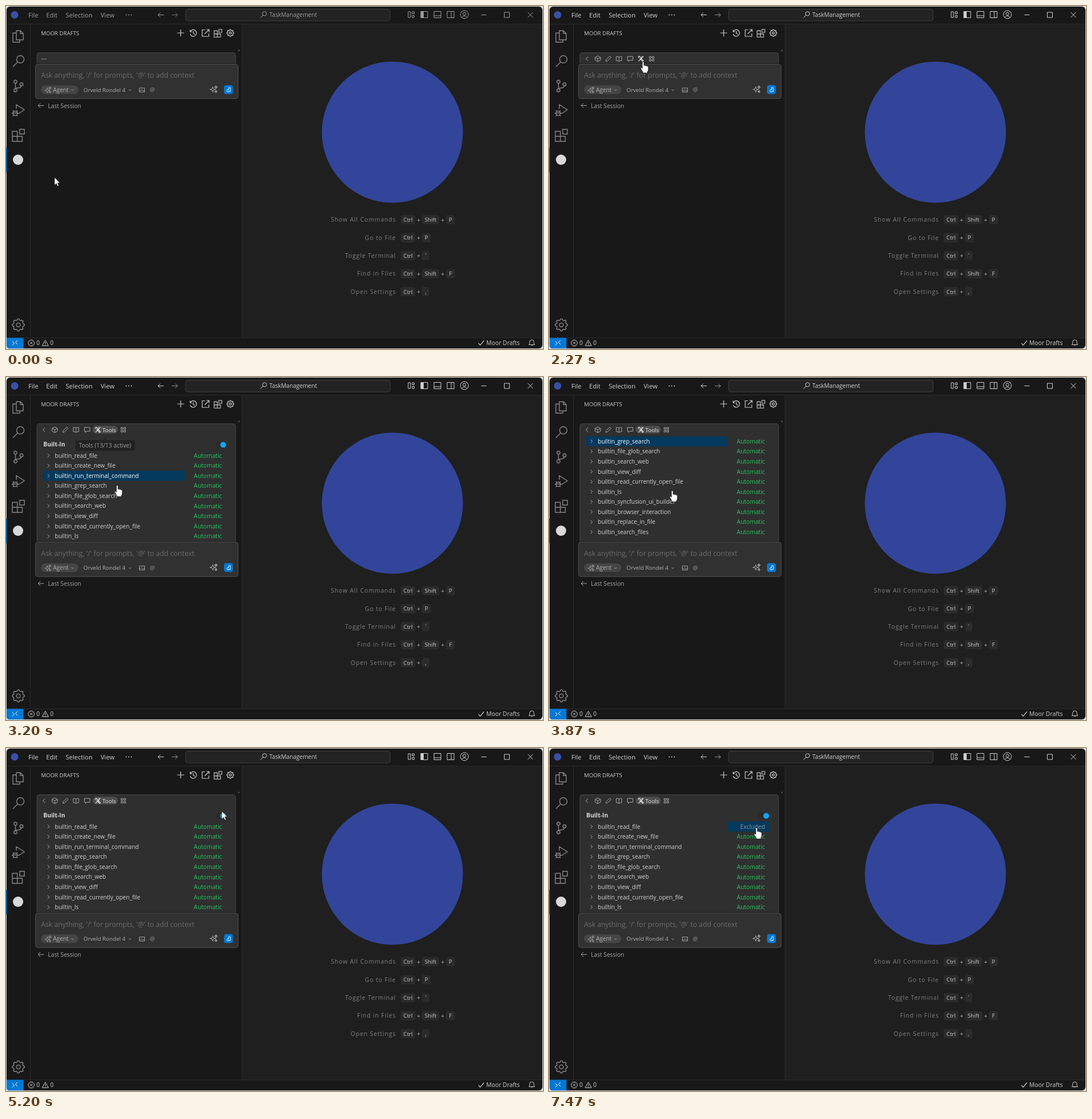
These frames come from a looping animation (936 px wide and 598 px high, 8000 ms). An HTML page:

```html
<!DOCTYPE html>
<html lang="en">
<head>
<meta charset="utf-8">
<title>Tool settings</title>
<style>
html, body { margin: 0; width: 100%; height: 100%; overflow: hidden; background: #dcdcdc; }
svg { display: block; width: 936px; height: 598px; }
text { font-family: "Open Sans", "Noto Sans", sans-serif; white-space: pre; }
</style>
</head>
<body>
<svg id="stage" viewBox="0 0 936 598" xmlns="http://www.w3.org/2000/svg"></svg>
<script>
const LOOP = 8000, TICK = 200 / 3;
const ROW = 17.57, LIST_TOP = 128.2;
const TOOLS = ['read_file', 'create_new_file', 'run_terminal_command', 'grep_search',
  'file_glob_search', 'search_web', 'view_diff', 'read_currently_open_file', 'ls',
  'syncfusion_ui_builder', 'browser_interaction', 'replace_in_file', 'search_files'];

// drawing helpers
const text = (x, mid, size, fill, str, extra = '') =>
  `<text x="${x}" y="${mid + size * 0.36}" font-size="${size}" fill="${fill}" ${extra}>${str}</text>`;
const rect = (x, y, w, h, fill, r = 0, extra = '') =>
  `<rect x="${x}" y="${y}" width="${w}" height="${h}" rx="${r}" fill="${fill}" ${extra}/>`;
const dot = (x, y, r, fill, extra = '') => `<circle cx="${x}" cy="${y}" r="${r}" fill="${fill}" ${extra}/>`;
const icon = (x, y, d, color = '#ccc', width = 1, extra = '') =>
  `<path transform="translate(${x} ${y})" d="${d}" fill="none" stroke="${color}" stroke-width="${width}" ${extra}/>`;
const END = 'text-anchor="end"', MIDDLE = 'text-anchor="middle"';
const ring = (x, y, r) => `M${x - r} ${y}a${r} ${r} 0 1 0 ${2 * r} 0a${r} ${r} 0 1 0 ${-2 * r} 0`;
const box = (x, y, w, h) => `M${x} ${y}h${w}v${h}h${-w}z`;
const star = (x, y, r) => `M${x} ${y - r}Q${x} ${y} ${x + r} ${y}Q${x} ${y} ${x} ${y + r}` +
  `Q${x} ${y} ${x - r} ${y}Q${x} ${y} ${x} ${y - r}`;

function gear(r) {
  let d = '';
  for (let i = 0; i < 32; i++) {
    const a = (i - 0.5) * Math.PI / 16, k = i % 4 < 2 ? r : r * 0.8;
    d += (i ? 'L' : 'M') + (k * Math.cos(a)).toFixed(2) + ' ' + (k * Math.sin(a)).toFixed(2);
  }
  return d + 'Z' + ring(0, 0, r * 0.32);
}
const blocks = s => box(-s, -s * 0.66, s * 0.83, s * 0.83) + box(-s, s * 0.17, s * 0.83, s * 0.83) +
  box(-s * 0.17, s * 0.17, s * 0.83, s * 0.83) + box(s * 0.22, -s, s * 0.78, s * 0.78);
const lens = r => ring(r * 0.3, -r * 0.3, r * 0.65) + `M${-r * 0.2} ${r * 0.2}L${-r} ${r}`;
const sparkle = star(-1, 1, 4.5) + star(3.5, -3, 2.4) + star(3.5, 4, 1.8);
const leftArrow = 'M5 0H-5M-1 -4L-5 0L-1 4';
const rightArrow = 'M-5 0H5M1 -4L5 0L1 4';
const down = 'M-2.2 -1L0 1.2L2.2 -1';
const grid = box(-4, -4, 3, 3) + box(1, -4, 3, 3) + box(-4, 1, 3, 3) + box(1, 1, 3, 3);

function frame() {
  return rect(1, 1, 934, 596, '#181818', 6) +
    rect(411, 31, 524, 547, '#1f1f1f') +
    icon(0, 0, 'M1 31.5H935M42.5 32V578M411.5 32V578M1 578.5H935', '#2b2b2b');
}

function titleBar() {
  const c = 'currentColor';
  let s = rect(313, 5.5, 356.5, 20.5, '#232323', 4, 'stroke="#3d3d3d"') + dot(15, 15.5, 6.5, '#3a50a8');
  [[39, 'File'], [70, 'Edit'], [104, 'Selection'], [165, 'View']]
    .forEach(([x, label]) => s += text(x, 16, 11.1, c, label));
  [209.5, 214, 218.5].forEach(x => s += dot(x, 15.5, 0.9, c));
  return `<g id="title">` + s + text(459, 15.5, 10.1, c, 'TaskManagement') +
    icon(270, 15.5, leftArrow, c) + icon(294, 15.5, rightArrow, c, 1, 'opacity=".65"') +
    icon(449, 15, lens(5.5), c) +
    icon(706, 15, box(-5, -5, 4, 10) + box(2, -5, 3.5, 3.5) + box(2, 1.5, 3.5, 3.5), c) +
    icon(729, 15, box(-6, -5.5, 12, 11), c) + rect(723, 9.5, 5, 11, c) +
    icon(752, 15, box(-6, -5.5, 12, 11) + 'M-6 2H6', c) +
    icon(775, 15, box(-6, -5.5, 12, 11) + 'M1 -5.5V5.5', c) +
    icon(799, 15, ring(0, 0, 7) + ring(0, -1.5, 2.5) + 'M-4.8 5Q0 -1 4.8 5', c) +
    icon(833, 15.5, 'M-4.5 0H4.5', c) + icon(873, 15.5, box(-4.5, -4.5, 9, 9), c) +
    icon(914, 15.5, 'M-4.5 -4.5L4.5 4.5M4.5 -4.5L-4.5 4.5', c) + '</g>';
}

function activityBar() {
  const c = '#868686', w = 1.4;
  return icon(21, 53, 'M-3 -10H4L9 -5V6H-3ZM4 -10V-5H9M-3 -6H-9V10H3V6', c, w) +
    icon(22, 96, lens(10), c, w) +
    icon(21, 139, ring(-4.5, -7, 2.8) + ring(-4.5, 8, 2.8) + ring(6, -2.5, 2.8) +
      'M-4.5 -4V5M6 .3Q5 4 -1.8 4Q-4.5 4 -4.5 5', c, w) +
    icon(21, 182, 'M-3 -3V-10L11 -1L1 5.5' + ring(-5, 5, 3.8) +
      'M-8.5 4.5H-1.5M-9 0L-7.5 2M-1 0L-2.5 2M-11 5H-9M-1 5H1M-9 10L-7.5 8M-1 10L-2.5 8', c, w) +
    icon(21.5, 225.5, blocks(10.5), c, w) + dot(21, 268, 9, '#d8d8d8') +
    rect(0, 247, 1.3, 43, '#0078d4') + icon(21.5, 556, gear(10.7), c, w, 'stroke-linejoin="round"');
}

function header() {
  return text(61, 47.5, 9.6, '#ccc', 'MOOR DRAFTS') +
    icon(304.5, 47, 'M-6 0H6M0 -6V6', '#ccc', 1.2) +
    icon(326.5, 47, 'M-5.5 -5.5V-2H-2M-5.3 -2.2A5.7 5.7 0 1 1 -5.5 2M0 -3V1L3 2.5', '#ccc', 1.2) +
    icon(348, 47, 'M-1 -5.5H-6V6H5.5V1M1.5 -6H6V-1.5M6 -6L-1.5 1.5', '#ccc', 1.2) +
    icon(369.5, 47.5, blocks(6.7), '#ccc', 1.1) + icon(391, 47, gear(6), '#ccc', 1.2) +
    dot(406, 77.5, 1.6, '#484848');
}

function toolbar() {
  const c = '#a8a8a8';
  let dots = '';
  [63, 66, 69].forEach(x => dots += dot(x, 92.5, 0.8, '#ccc'));
  return `<rect id="panel" x="54" y="81.5" width="346" rx="4" fill="#2f2f2f" stroke="#4a4a4a"/>` +
    `<g id="dots">${dots}</g><g id="icons">` +
    `<g id="pill">${rect(151, 85, 44, 13.5, '#4d4d4d', 6.5)}${text(168, 92, 9.8, '#e6e6e6', 'Tools')}</g>` +
    icon(66, 92, 'M2 -3.5L-1.8 0L2 3.5', c) +
    icon(85, 92, 'M0 -5L4.7 -2.5V2.5L0 5L-4.7 2.5V-2.5ZM-4.7 -2.5L0 0L4.7 -2.5M0 0V5', c) +
    icon(103.5, 92, 'M-4.5 4.5L-3.7 1.5L2.5 -4.7L4.7 -2.5L-1.5 3.7Z', c) +
    icon(122, 92, 'M0 -3Q-2 -4.3 -4.7 -4V3.5Q-2 3.2 0 4.5Q2 3.2 4.7 3.5V-4Q2 -4.3 0 -3V4.5', c) +
    icon(141.5, 92, 'M-4.7 -4H4.7V2.5H-1L-3 4.7V2.5H-4.7Z', c) +
    icon(160, 92, 'M-4 4.3L3 -2.7M4.7 -4.3L2 -2L2 -4.7M-4.5 -3.5L-2.5 -4.5L4.5 3.5L3.2 4.6L-2 -1M-4.5 -3.5L-3.5 -1.5', '#ddd', 1.2) +
    `<g id="grid">${icon(0, 92, grid, c)}</g></g>`;
}

function list() {
  let rows = '';
  TOOLS.forEach((name, i) => {
    const y = 137 + i * ROW;
    rows += icon(74, y, 'M-1.5 -3L1.6 0L-1.5 3', '#b5b5b5') +
      text(85, y, 10.05, '#d2d2d2', 'builtin_' + name, 'class="name"') +
      text(376.5, y, 10.3, '#22c55e', 'Automatic', END + ' class="policy"');
  });
  return `<clipPath id="clip"><rect id="clipBox" x="55" y="103" width="344"/></clipPath>` +
    `<g clip-path="url(#clip)"><g id="list">` +
    `<rect id="hover" height="${ROW}" fill="#04395e"/>` +
    text(65, 117.5, 10.3, '#d8d8d8', 'Built-In', 'font-weight="700"') +
    rect(365.5, 112.5, 18.5, 11.5, '#292929', 5.7) +
    `<circle id="knob" cy="118.2" r="5.4" stroke="#222" stroke-width=".6"/>` + rows + '</g></g>';
}

function prompt() {
  return '<g id="prompt">' + rect(53.5, 100, 347, 3, '#1c1c1c') +
    rect(51.5, 101.5, 353, 60, '#313131', 4, 'stroke="#505050"') +
    text(61, 121, 12.2, '#6c6c6c', "Ask anything, '/' for prompts, '@' to add context") +
    rect(61, 138.5, 65, 15, '#454545', 7.5) +
    icon(73, 146, sparkle, '#b0b0b0', 0.8) + text(82, 146, 10, '#b0b0b0', 'Agent') +
    icon(116, 146.5, down, '#999') +
    text(135, 146, 9.8, '#b0b0b0', 'Orveld Rondel 4') + icon(216, 146.5, down, '#999') +
    icon(237, 146.5, box(-4.5, -3.5, 9, 7) + 'M-4.5 2.5L-1 -.5L1.5 1.5L2.8 .5L4.5 2', '#a0a0a0') +
    text(255, 146, 9.6, '#a0a0a0', '@', MIDDLE) +
    icon(362, 145, star(-1.5, 0.5, 5) + star(4, -3.5, 2.6) + star(4, 4.2, 2.2), '#c0c0c0') +
    rect(380, 138, 15.5, 15.5, '#0078d4', 4) +
    icon(388, 146, 'M0 -3.5H3V3H-1V4.3L-3.5 1.8L-1 -.6V.6H0Z', '#fff', 0.9) +
    '<g id="session">' + icon(61, 173.5, leftArrow, 'currentColor', 1, 'stroke-linejoin="round"') +
    text(73, 174, 10.2, 'currentColor', 'Last Session') + '</g></g>';
}

function shortcuts() {
  let s = '';
  const key = (x, y, w, label) => rect(x, y - 8, w, 16, '#2b2b2b', 3) +
    text(x + w / 2, y, 9.7, '#ccc', label, MIDDLE);
  [['Show All Commands', 'P', 1], ['Go to File', 'P'], ['Toggle Terminal', '`'],
    ['Find in Files', 'F', 1], ['Open Settings', ',']].forEach(([label, last, shift], i) => {
    const y = 372.5 + i * 31.4, x = shift ? 767 : 725;
    s += text(679.8, y, 10.3, '#808080', label, END + ' letter-spacing=".9"') +
      key(688, y, 25.5, 'Ctrl') + text(719, y + 0.5, 10, '#bbb', '+', MIDDLE);
    if (shift) s += key(725, y, 30, 'Shift') + text(761, y + 0.5, 10, '#bbb', '+', MIDDLE);
    s += key(x, y, last === 'P' || last === 'F' ? 15.5 : 13, last);
  });
  return dot(673.5, 220, 123, '#32459a') + s;
}

function statusBar() {
  return `<path d="M1 578.5H30.5V597H6Q1 597 1 592Z" fill="#0078d4"/>` +
    icon(15.5, 587.5, 'M-4.5 -3L-1 .5L-4.5 4M4.5 -4.5L1 -1L4.5 2.5', '#fff') +
    icon(44, 587.5, ring(0, 0, 5.3) + 'M-2.2 -2.2L2.2 2.2M2.2 -2.2L-2.2 2.2') +
    text(53, 587.5, 10.4, '#ccc', '0') +
    icon(68.5, 587.5, 'M0 -5L5.5 4.7H-5.5ZM0 -1.5V1.7M0 2.7V3.7') +
    text(77, 587.5, 10.4, '#ccc', '0') +
    icon(828, 587.5, 'M-4.5 .5L-1.5 3.8L5 -4', '#ccc', 1.2) +
    text(837, 587.5, 10.4, '#ccc', 'Moor Drafts') +
    icon(916.5, 587, 'M-5 3.5H5L3.7 1V-1.5Q3.5 -5 0 -5T-3.7 -1.5V1ZM-1.3 3.8Q0 6.3 1.3 3.8');
}

function overlays() {
  const tip = 'stroke="#333"';
  return `<g id="tipExpand">${rect(84, 82, 86.5, 19, '#1d1d1d', 3, tip)}` +
    `${text(91, 91.5, 10, '#ccc', 'Expand Toolbar')}</g>` +
    `<g id="tipTools"><path d="M168 109.5L172.5 105.5L177 109.5Z" fill="#1c1c1c"/>` +
    `${rect(120.5, 109.5, 105, 20, '#1c1c1c', 3, tip)}` +
    `${text(127, 119.5, 10.25, '#d5d5d5', 'Tools (13/13 active)')}</g>` +
    `<g id="cursor"><path id="arrow" fill="#fff" stroke="#111" stroke-width=".7"
      d="M0 0V13.8L3.2 10.8L5.4 15.6L7.6 14.6L5.4 9.9H9.6Z"/>
    <path id="beam" fill="none" stroke="#ddd" d="M-3 -8H-1L0 -7L1 -8H3M0 -7V7M-3 8H-1L0 7L1 8H3"/>
    <path id="hand" fill="#fff" stroke="#111" stroke-width=".7"
      d="M-1.6 1.4Q-1.6 0 -.2 0T1.2 1.4V6.5Q3 5.6 3.8 7Q5.6 6.2 6.3 7.7Q8.6 7.2 8.8 9.5V13Q8.8 16 7.2 17.5V19.5H-.6V18L-4 12.5Q-5 10.5 -3.6 10.3Q-2.6 10.2 -1.6 11.6Z"/></g>`;
}

document.getElementById('stage').innerHTML = frame() + titleBar() + activityBar() + header() +
  toolbar() + list() + prompt() + shortcuts() + statusBar() + overlays();

const el = id => document.getElementById(id);
const set = (id, attrs) => { for (const k in attrs) el(id).setAttribute(k, attrs[k]); };
const show = (id, on) => set(id, { visibility: on ? 'inherit' : 'hidden' });
const names = document.querySelectorAll('.name'), policies = document.querySelectorAll('.policy');

// motion helpers
const ramp = (t, a, b) => Math.min(1, Math.max(0, (t - a) / (b - a)));
const ease = (t, a, b) => { const k = ramp(t, a, b); return k * k * (3 - 2 * k); };
const PATH = [[0, 84.5, 298.7], [470, 88, 185], [866, 70, 124], [1130, 69, 86.3], [1600, 69, 86.3],
  [2066, 172, 110], [2330, 163, 95], [2933, 163, 95], [3200, 194, 189], [3400, 215, 198],
  [4530, 215, 198], [5133, 374, 107], [5200, 376, 110], [5400, 376, 118], [6600, 376, 118],
  [7000, 362, 139]];

function pointer(t) {
  let [, x, y] = PATH[0];
  for (let i = 1; i < PATH.length; i++) {
    const k = ease(t, PATH[i - 1][0], PATH[i][0]);
    x += (PATH[i][1] - PATH[i - 1][1]) * k;
    y += (PATH[i][2] - PATH[i - 1][2]) * k;
  }
  return { x, y };
}

function render(t) {
  const open = ease(t, 2800, 3100), shift = 186.5 * open;
  const scroll = 77.5 * (ease(t, 3600, 3860) - ease(t, 4270, 4530));
  const expanded = t >= 1590, selected = t >= 2790;

  set('title', { color: expanded ? '#d0d0d0' : '#9d9d9d' });
  show('dots', !expanded);
  show('icons', expanded);
  show('pill', selected);
  set('grid', { transform: `translate(${selected ? 204.5 : 179} 0)` });

  set('panel', { height: 22 + shift });
  set('prompt', { transform: `translate(0 ${shift})` });
  set('clipBox', { height: Math.max(0, shift - 2) });
  set('list', { transform: `translate(0 ${-scroll - 3.4 * (1 - open)})`, opacity: 0.7 + 0.3 * open });

  // hover trails the pointer by one tick
  const at = pointer(t - TICK), row = Math.floor((at.y - LIST_TOP) / ROW), onPolicy = at.x > 312;
  const hovering = open > 0 && row >= 0 && row < TOOLS.length;
  show('hover', hovering);
  if (hovering) {
    set('hover', { x: onPolicy ? 312 : 65, width: onPolicy ? 72 : 247, y: LIST_TOP + row * ROW });
  }

  const off = ramp(t, 5600, 5860) - ramp(t, 6470, 6730), disabled = off > 0;
  set('knob', { cx: 378.5 - 7.5 * off, fill: off > 0.5 ? '#8a8a8a' : '#0fa5f5' });
  TOOLS.forEach((_, i) => {
    const excluded = disabled || (i === 0 && t >= 7460);
    names[i].setAttribute('fill', hovering && !onPolicy && i === row ? '#fff' : '#d2d2d2');
    names[i].setAttribute('opacity', 1 - 0.4 * off);
    policies[i].textContent = excluded ? 'Excluded' : 'Automatic';
    policies[i].setAttribute('fill', excluded ? '#8c969f' : '#22c55e');
  });

  set('tipExpand', { opacity: expanded ? 0 : ramp(t, 1250, 1530) });
  set('tipTools', { opacity: ramp(t, 2470, 2670) - ramp(t, 3130, 3330) });

  const p = pointer(t);
  set('session', { color: t < 900 && p.y > 164 && p.y < 183 ? '#ddd' : '#a5a5a5' });
  const beam = t > 800 && t < 960, arrow = t <= 800 || (t > 4800 && t < 5250);
  show('arrow', arrow);
  show('beam', beam);
  show('hand', !arrow && !beam);
  set('cursor', { transform: `translate(${p.x} ${p.y})` });
}

const start = performance.now();
function loop() {
  const t = (performance.now() - start) % LOOP;
  render(Math.floor((t + 4) / TICK) * TICK);
  requestAnimationFrame(loop);
}
loop();
</script>
</body>
</html>
```
